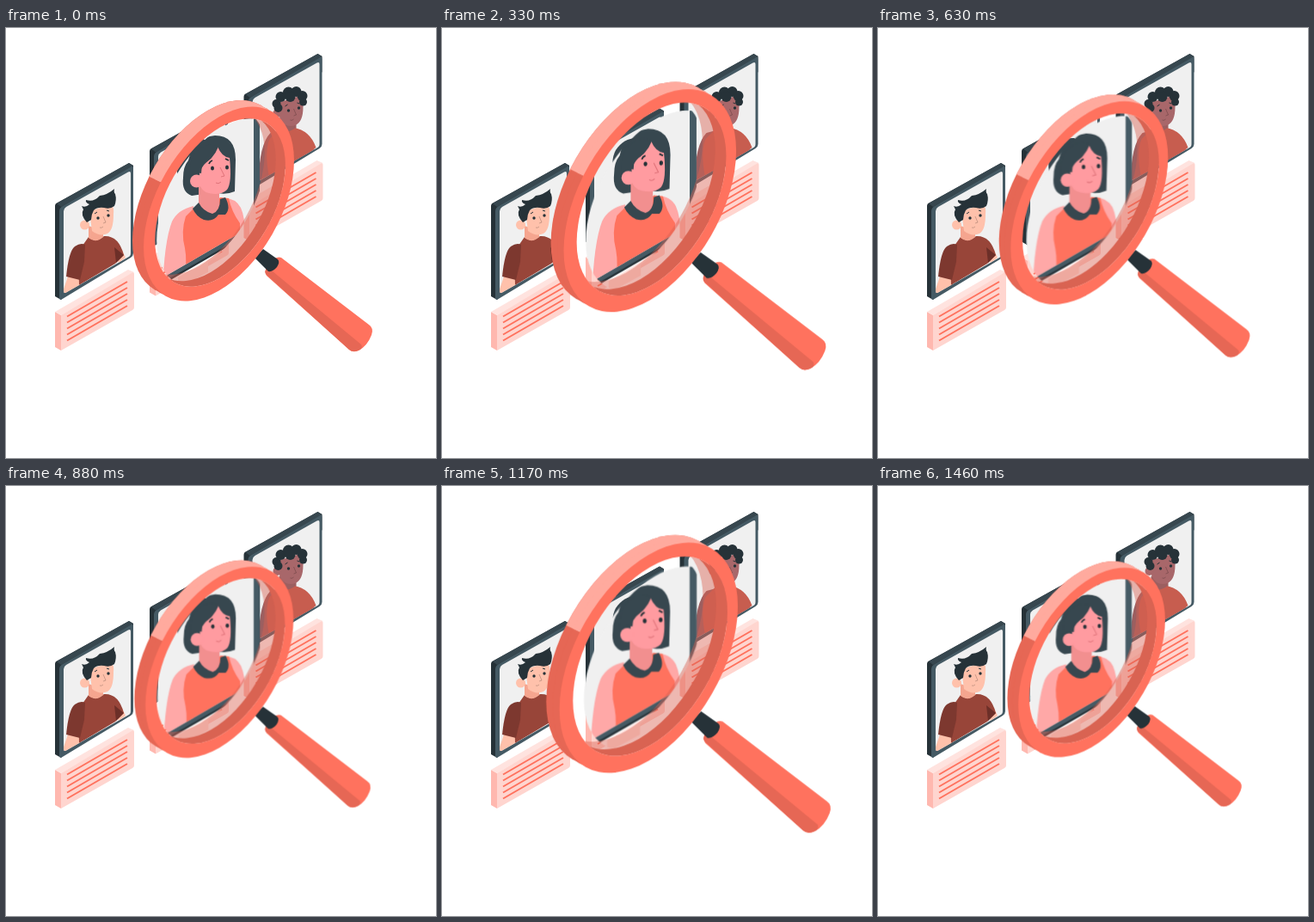
These frames come from a looping animation (500x500 px, 1.5 s). An HTML page without scripts:

```html
<!DOCTYPE html>
<html lang="en">
<head>
<meta charset="utf-8">
<title>Profile search</title>
<style>
  html, body { margin: 0; width: 100%; height: 100%; overflow: hidden; background: #fff; }
  svg { display: block; width: 100%; height: 100%; }
  .zoom { transform-origin: 286.5px 230.5px; animation: zoom 1.5s linear infinite; }
  .lens { --k: 1; }
  .view { --k: .5; }
  @keyframes zoom {
    0%, 2.6% { transform: scale(1); }
    2.66% { transform: scale(calc(1 - .079 * var(--k))); }
    26.4% { transform: scale(calc(1 + .197 * var(--k))); }
    41.7% { transform: scale(calc(1 + .05 * var(--k))); }
    53.3% { transform: scale(calc(1 - .079 * var(--k))); }
    77% { transform: scale(calc(1 + .197 * var(--k))); }
    100% { transform: scale(calc(1 - .052 * var(--k))); }
  }
</style>
</head>
<body>
<svg viewBox="0 0 500 500">
  <defs>
    <!-- circles seen on the tilted card plane -->
    <circle id="rim" r="101" transform="matrix(.866 -.5 0 1 0 0)"/>
    <circle id="hole" r="87.500" transform="matrix(.866 -.5 0 1 249 203)"/>
    <path id="screenShape" d="M67 213Q67 210 70 208L142 167.500Q145 166 145 169V262Q145 265 142 266.500L70 307.500Q67 309 67 306Z"/>
    <clipPath id="screenClip"><use href="#screenShape"/></clipPath>
    <clipPath id="viewClip"><use href="#hole" x="2"/></clipPath>
    <clipPath id="backClip"><use href="#hole" x="-22" y="-13"/><path d="M100 60H235V330H100Z"/></clipPath>
    <clipPath id="bigScreen"><path d="M150 80H288V229L150 309Z"/></clipPath>
    <clipPath id="litSide"><path d="M120 60H310V120L190 184L167 173L120 150Z"/></clipPath>
    <mask id="ringMask" maskUnits="userSpaceOnUse" x="0" y="0" width="500" height="500">
      <rect width="500" height="500" fill="#fff"/><use href="#hole"/>
    </mask>
    <mask id="wallMask" maskUnits="userSpaceOnUse" x="0" y="0" width="500" height="500">
      <use href="#hole" fill="#fff"/><use href="#hole" x="-11" y="-6.500"/>
    </mask>
    <mask id="glassMask" maskUnits="userSpaceOnUse" x="0" y="0" width="500" height="500">
      <use href="#hole" fill="#fff"/><use href="#hole" x="-24" y="-14"/>
    </mask>

    <g id="profile">
      <path fill="#263238" d="M57 207Q57 204 60 203L143 157L148 160V178L64 316L57 312Z"/>
      <path fill="#37474f" d="M59 204L143 157L148 160L64 208Z"/>
      <path fill="#455a64" d="M62 213Q62 209 66 207L146 161Q148 160 148 163V262Q148 265 145 267L64 316L62 315Z"/>
      <use href="#screenShape" fill="#f0f0f0"/>
      <path fill="#ffb8af" d="M57 330L64 334V375L57 371Z"/>
      <path fill="#ffe3df" d="M57 330L142 281L149 284L64 334Z"/>
      <path fill="#ffd5cf" d="M64 334L146 285Q149 283 149 286V325Q149 327 147 328L64 375Z"/>
      <path fill="none" stroke="#ff725e" stroke-width="2" d="M71 335.500L141 295M71 342.500L141 302M71 349.500L141 309M71 356.500L141 316M71 363.500L141 323"/>
    </g>

    <g id="face" fill="#263238">
      <circle cx="107" cy="221" r="1.700"/><circle cx="119" cy="218" r="1.700"/>
      <path fill="none" stroke="#263238" d="M103 216L106 214M117 212L120 213"/>
      <path fill="none" stroke="#000" stroke-opacity=".2" d="M113 219L116 226L113 227M109 232Q111 233 113 231"/>
    </g>
  </defs>

  <!-- right card -->
  <use href="#profile" x="219.500" y="-127"/>
  <g transform="translate(219.500 -127)" clip-path="url(#screenClip)">
    <path fill="#9c5f60" d="M74 306Q75 262 88 249L99 246V230H118V247L130 256L144 275V304Z"/>
    <path fill="#c75d4f" d="M86 298Q81 270 87 256L98 245Q108 251 115 243Q134 246 141 266L132 273V282Z"/>
    <path fill="#9c5f60" d="M98 232L116 235V244Q108 250 98 245Z"/>
    <path fill="#a8676a" d="M96 214L122 206Q127 208 126 219Q126 236 117 240Q105 244 99 232Z"/>
    <circle cx="96" cy="226" r="5" fill="#a8676a"/>
    <g fill="#263238">
      <circle cx="95" cy="215" r="5"/><circle cx="97" cy="220" r="5"/><circle cx="100" cy="207" r="6"/>
      <circle cx="109" cy="202" r="6.500"/><circle cx="118" cy="201" r="6"/><circle cx="125" cy="206" r="6"/>
      <circle cx="126" cy="213" r="4.500"/><circle cx="111" cy="207" r="6"/>
    </g>
    <use href="#face" x="2" y="2"/>
  </g>

  <!-- middle card, mostly behind the lens -->
  <use href="#profile" x="110" y="-63.500"/>
  <path fill="#37474f" d="M201 177Q195 155 202 142Q212 127 228 128L245 140V175Z"/>

  <!-- left card -->
  <use href="#profile"/>
  <g clip-path="url(#screenClip)">
    <path fill="#ffc1ab" d="M64 312L72 289L87 291L85 312ZM128 268L135 258L139 267L131 273Z"/>
    <path fill="#984539" d="M85 299L84 260L96 243Q104 251 114 242Q131 241 137 264L127 274Z"/>
    <path fill="#7d382f" d="M70 289Q73 259 80 254Q87 249 92 252L91 272L86 293Z"/>
    <path fill="#6c2f28" d="M126 255L137 264L128 273Z"/>
    <path fill="#f5a58f" d="M96 230L113 236V243Q104 251 96 244Z"/>
    <path fill="#ffc1ab" d="M97 213L122 205Q126 208 125 217Q125 235 118 239Q109 243 100 236Z"/>
    <circle cx="91.500" cy="229" r="5.500" fill="#ffc1ab"/>
    <path fill="#263238" d="M94 226Q86 217 90 211L88 207Q93 209 97 205Q92 203 93 200Q102 203 109 195Q118 194 126 187Q125 191 127 193Q129 200 126 207Q121 211 114 209Q106 208 102 212Q99 217 99 223Z"/>
    <use href="#face"/>
  </g>

  <!-- magnified picture -->
  <g class="zoom view">
    <g clip-path="url(#viewClip)"><g clip-path="url(#backClip)">
      <path fill="#fff" d="M150 80H295V233L272 330H150Z"/>
      <path fill="#ffe3df" d="M200 290L275 245V262L200 303Z"/>
      <path fill="#263238" d="M150 80H295V233L150 317Z"/>
      <path fill="#455a64" d="M150 80H295V231L150 314Z"/>
      <g clip-path="url(#bigScreen)">
        <path fill="#f0f0f0" d="M150 80H290V320H150Z"/>
        <path fill="#37474f" d="M216 195Q204 191 206 174Q206 161 212 154Q218 128 243 125Q267 125 267 153L266 190Q254 195 243 191Z"/>
        <path fill="#ffa8a7" d="M182 305Q184 248 193 225Q200 211 218 207L222 255L210 300ZM249 198Q266 196 273 209Q278 220 278 240L262 248Z"/>
        <path fill="#ff725e" d="M207 290Q211 272 208 256Q203 237 209 219L221 207Q235 214 249 197L259 198Q262 213 272 227V248Z"/>
        <path fill="#f28f8f" d="M224 180L248 190V207Q245 217 237 218Q227 216 224 207Z"/>
        <path fill="#37474f" d="M217 210L224 203Q229 213 240 216Q249 213 249 199L255 197Q262 210 255 217L247 217Q241 226 230 223Q221 219 217 210Z"/>
        <path fill="#ff9ba0" d="M225 168Q229 158 238 152L246 138Q251 150 260 151Q263 180 257 188Q250 195 236 192Q227 190 225 181Z"/>
        <circle cx="221.500" cy="178" r="7.500" fill="#ff9ba0"/>
        <path fill="#37474f" d="M214 170Q213 151 222 143Q236 131 247 138Q241 153 228 159L227 169Q220 167 214 174Z"/>
        <g fill="#263238">
          <ellipse cx="240" cy="163" rx="2" ry="2.500"/><ellipse cx="257" cy="162" rx="2" ry="2.500"/>
          <path fill="none" stroke="#263238" stroke-width="1.800" d="M236 158Q237 155 240 154M255 152L259 154"/>
          <path fill="none" stroke="#e0737a" d="M249 162L254 172L250 173M244 180Q247 182 250 179"/>
        </g>
      </g>
    </g></g>
  </g>

  <!-- magnifier -->
  <g class="zoom lens">
    <path fill="#ff725e" d="M302 286Q300 280 307 273Q314 265 320 267L422 345Q428 349 425 357Q420 370 410 375Q403 378 399 374L303 288Z"/>
    <path fill="#e66755" d="M302 286Q300 283 304 278L413 368Q415 371 412 374Q404 378 399 374Z"/>
    <path fill="#263238" d="M289 267L299 257L316 269Q319 272 315 278Q310 284 305 283Z"/>
    <path fill="#d96352" fill-opacity=".45" mask="url(#glassMask)" d="M130 70H350V330H130Z"/>
    <path fill="#d96352" mask="url(#wallMask)" d="M130 70H350V330H130Z"/>
    <g mask="url(#ringMask)">
      <g fill="#e66755">
        <use href="#rim" x="234.500" y="197"/><use href="#rim" x="241" y="200.750"/>
      </g>
      <g fill="#ffaa9e" clip-path="url(#litSide)">
        <use href="#rim" x="234.500" y="197"/><use href="#rim" x="241" y="200.750"/>
      </g>
      <use href="#rim" x="247.500" y="204.500" fill="#ff725e"/>
    </g>
  </g>
</svg>
</body>
</html>
```
